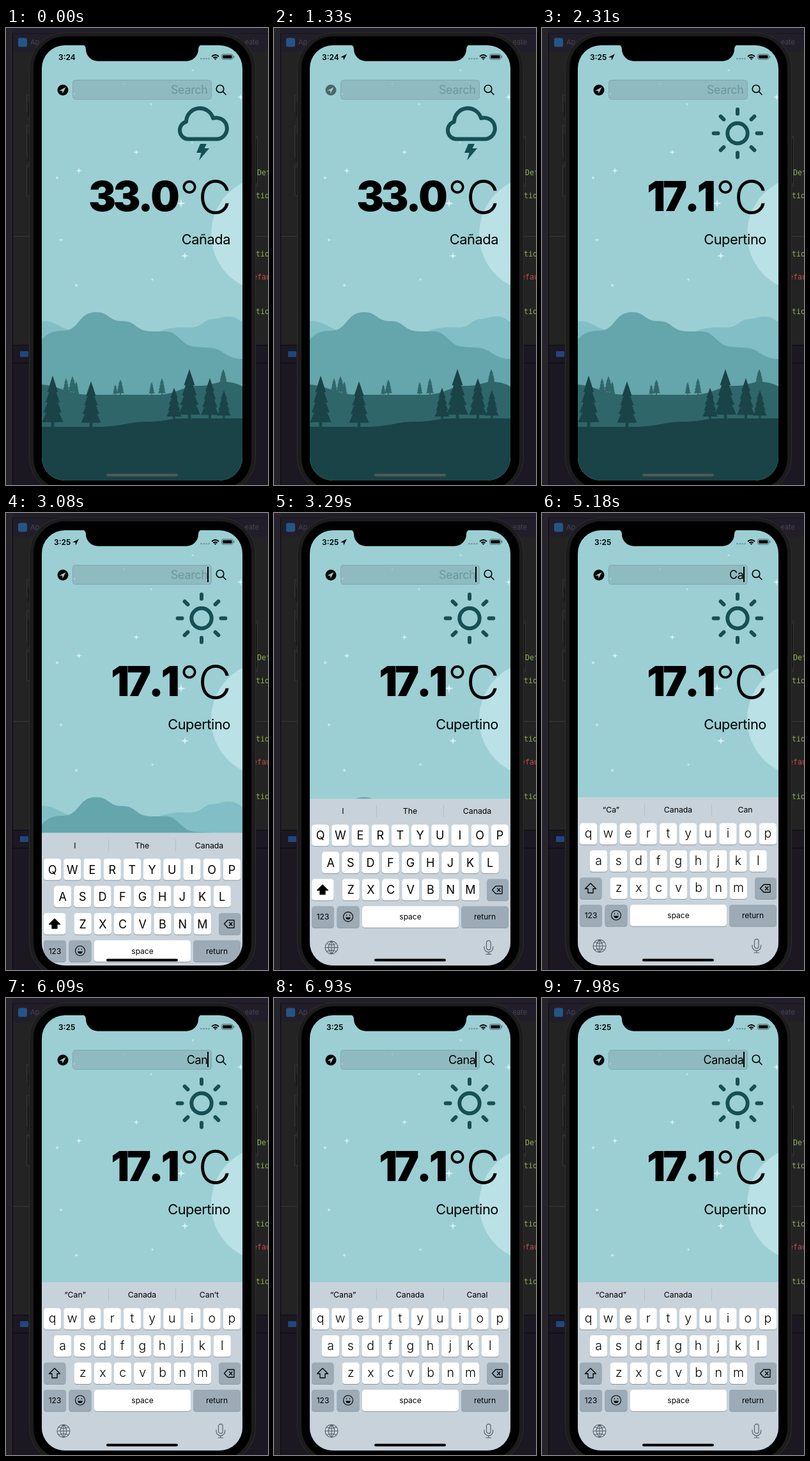
These frames come from a looping animation (410x714 px, 8 s). An HTML page:

```html
<!DOCTYPE html>
<html lang="en">
<head>
<meta charset="utf-8">
<title>Weather search</title>
<style>
html, body { margin: 0; width: 100%; height: 100%; overflow: hidden; background: #232324; }
svg { display: block; width: 410px; height: 714px; font-family: Inter, Roboto, sans-serif; }
.code { font: 11.6px "DejaVu Sans Mono", monospace; fill: #8fb04a; }
.mid { text-anchor: middle; }
.end { text-anchor: end; }
.tight { letter-spacing: -.02em; }
#degrees { font-kerning: none; letter-spacing: -.065em; }
</style>
</head>
<body>
<svg id="stage" viewBox="0 0 410 714">
  <defs>
    <clipPath id="screenClip"><rect x="56" y="27" width="314" height="680" rx="36"/></clipPath>
    <path id="pointer" d="M0 5.2L10 0L5 10L4.6 5.6Z"/>
  </defs>

  <!-- Desktop behind the phone -->
  <rect width="410" height="714" fill="#232324"/>
  <rect width="410" height="37" fill="#211e29"/>
  <path d="M0 8.5H410" stroke="#17151c"/>
  <rect y="496" width="410" height="218" fill="#1b1822"/>
  <rect width="10" height="714" fill="#27232b"/>
  <path d="M10.5 8V714M11 495.5H410M11 523.5H410" stroke="#0b0a0e"/>
  <path d="M11 325.5H410" stroke="#38383a"/>
  <path d="M37 104.500H32.500V130H37M37 152.500H32.500V200H37M37 214.500H32.500V262H37M388 169.500H393.500V247H388" fill="none" stroke="#363638"/>
  <rect x="19" y="15.500" width="14" height="14" rx="3" fill="#245586"/>
  <rect x="22" y="505" width="13" height="9" rx="1" fill="#20467f"/>
  <g font-size="11" fill="#48434f"><text x="38" y="26">Ap</text><text class="end" x="396" y="26">eate</text></g>
  <g class="code">
    <text x="393" y="230">Def</text><text x="384" y="266">ation</text><text x="384" y="357">ation</text>
    <text x="386" y="393" fill="#c94848">efault</text><text x="384" y="447">ation</text>
  </g>

  <!-- Phone body -->
  <path d="M35.500 117V139M35.500 167V208M35.500 219V261M391.500 174V242" stroke="#151515" stroke-width="2"/>
  <rect x="36.500" y="7.500" width="354" height="719" rx="56" fill="#1c1c1d" stroke="#2d2d2e"/>
  <rect x="43" y="13" width="341" height="708" rx="50" fill="#000"/>

  <g clip-path="url(#screenClip)">
    <rect x="56" y="27" width="314" height="680" fill="#9bcfd4"/>
    <circle cx="411" cy="322" r="90" fill="#bae1e5"/>
    <path id="stars" fill="#d9f2f4"/>
    <path d="M56 458C72 456 82 466 98 472L140 520H56ZM240 474C256 468 270 467 286 468C306 469 308 456 322 455C336 454 340 450 351 451C361 451 364 457 370 459V530H240Z" fill="#82bec5"/>
    <path d="M56 487C66 475 76 473 90 473C116 472 112 444 141 444C162 444 160 458 182 458C204 457 202 474 228 474H250C270 474 274 497 296 498C318 500 326 498 338 506C350 514 358 517 370 517V600H56Z" fill="#65a5ac"/>
    <path d="M56 557C82 559 102 573 130 573H238C268 572 278 559 300 559C326 559 324 552 346 553Q360 554 370 560V650H56Z" fill="#2f666a"/>
    <path id="farTrees" fill="#2f666a"/>
    <path d="M56 623H150C184 622 192 615 222 615C250 615 252 610 282 610H370V707H56Z" fill="#1a4347"/>
    <path id="nearTrees" fill="#1a4347"/>

    <!-- Search row -->
    <g id="locate"><circle cx="89" cy="97" r="8.500"/><use href="#pointer" x="83.500" y="92.500" fill="#9bcfd4"/></g>
    <rect x="104.500" y="81.500" width="217" height="30" rx="4" fill="#8fbac0" stroke="#80a9af"/>
    <path id="fieldStars" fill="#b9dadd"/>
    <text id="query" class="end tight" x="315.500" y="103" font-size="18"></text>
    <rect id="caret" x="315" y="84" width="2" height="24"/>
    <g fill="none" stroke="#000" stroke-width="1.600" stroke-linecap="round"><circle cx="335" cy="95" r="5.800"/><path d="M339.300 99.300L344 104"/></g>

    <!-- Weather -->
    <g id="storm" fill="none" stroke="#174f56" stroke-width="6" stroke-linejoin="round">
      <path d="M284 173.500A13.800 13.800 0 0 1 282 146.500A21.400 21.400 0 0 1 324 141A16.700 16.700 0 1 1 331 173.500Z"/>
      <path d="M304 181H314L310.500 188H318L302 207L305.500 195H298Z" fill="#174f56" stroke="none"/>
    </g>
    <g id="sun" fill="none" stroke="#174f56" stroke-width="6" stroke-linecap="round"><circle cx="306" cy="164.500" r="15.700"/><path id="rays"/></g>
    <text id="degrees" class="end" x="267.500" y="286" font-size="64" font-weight="900"></text>
    <text class="mid" x="287" y="286" font-size="66" font-weight="300">°</text>
    <text class="end" x="353" y="290" font-size="72" font-weight="300">C</text>
    <text id="city" class="end tight" x="351" y="338" font-size="21.800"></text>

    <g id="keyboard"></g>
    <rect id="home" x="157" y="696.500" width="112" height="4" rx="2"/>
  </g>

  <!-- Notch and status bar -->
  <path d="M119 26Q125 27 125 33A18.700 18.700 0 0 0 143.700 51.700H282.300A18.700 18.700 0 0 0 301 33Q301 27 307 26Z"/>
  <g font-size="12" font-weight="600">
    <text id="clock" x="82" y="49.500"></text>
    <g id="tracking"><text id="trackClock" x="75" y="49.500"></text><use href="#pointer" x="104" y="40.500"/></g>
  </g>
  <path d="M305.500 48H319" stroke="#6d9297" stroke-width="2.600" stroke-linecap="round" stroke-dasharray="0 4"/>
  <g fill="none" stroke="#000" stroke-width="1.900"><path d="M322 44.500Q327.500 39.500 333 44.500M324.300 46.800Q327.500 44 330.700 46.800"/><path d="M326 48L327.500 49.500L329 48Z" stroke-width="1"/></g>
  <rect x="337.500" y="41" width="17.500" height="8" rx="2.400" fill="none" stroke="#4b686b"/><rect x="339" y="42.500" width="14.500" height="5" rx="1.200"/><path d="M356.600 43.500V46.500" stroke="#4b686b" stroke-width="1.200"/>
</svg>
<script>
const LOOP = 8000, STEP = 70, KEY_W = 27.2, KEY_H = 33.5, PITCH = 31.2;
const $ = id => document.getElementById(id);
const clamp = x => Math.max(0, Math.min(1, x));
const ramp = (t, from, to) => clamp((t - from) / (to - from));

function add(parent, tag, attrs, text) {
  const node = document.createElementNS("http://www.w3.org/2000/svg", tag);
  for (const name in attrs) node.setAttribute(name, attrs[name]);
  if (text !== undefined) node.textContent = text;
  return parent.appendChild(node);
}
const setText = (node, text) => { if (node.textContent !== text) node.textContent = text; };
const fade = (node, opacity) => node.setAttribute("opacity", opacity);

// Scenery
const star = ([x, y, r]) => {
  const k = r * .2;
  return `M${x} ${y - r}L${x + k} ${y - k}L${x + r} ${y}L${x + k} ${y + k}L${x} ${y + r}L${x - k} ${y + k}L${x - r} ${y}L${x - k} ${y - k}Z`;
};
const tree = ([x, top, base, width]) => {
  const h = base - top, half = width / 2;
  const tier = (from, to, w) =>
    `M${x} ${top + h * from}L${x + half * w} ${top + h * to}H${x - half * w}Z`;
  return tier(0, .32, .5) + tier(.12, .52, .68) + tier(.25, .71, .84) + tier(.4, .9, 1) +
    `M${x - half * .14} ${top + h * .8}H${x + half * .14}V${base + 3}H${x - half * .14}Z`;
};
const draw = (id, shape, items) => $(id).setAttribute("d", items.map(shape).join(""));
draw("stars", star, [[114, 223, 5], [80, 234, 3.5], [204, 194, 4.5], [227, 119, 2.2], [292, 66, 2.2],
  [367, 108, 5.5], [274, 274, 7], [280, 356, 6], [86, 331, 3.2], [110, 402, 3.2], [229, 393, 2.8], [291, 179, 2]]);
draw("fieldStars", star, [[185, 88, 1.8], [107, 103, 2]]);
draw("farTrees", tree, [[94, 547, 571, 11], [104, 544, 571, 14], [110, 552, 573, 9], [171, 557, 573, 8],
  [179, 549, 573, 12], [228, 553, 573, 9], [244, 547, 573, 12], [340, 533, 557, 13]]);
draw("nearTrees", tree, [[73, 543, 624, 33], [133, 552, 624, 31], [263, 562, 612, 23],
  [287, 533, 612, 34], [319, 547, 611, 28], [341, 566, 610, 21]]);
draw("rays", i => {
  const a = i * Math.PI / 4, p = r => `${306 + r * Math.cos(a)} ${164.5 + r * Math.sin(a)}`;
  return `M${p(30.5)}L${p(37.3)}`;
}, [...Array(8).keys()]);

// Keyboard
const board = $("keyboard"), keys = {};
add(board, "rect", { x: 56, y: 444, width: 314, height: 330, fill: "#c7d2da" });
add(board, "path", { d: "M160.500 454V473M265.500 454V473", stroke: "#b2bdc5" });
const hints = [108, 213, 318].map(x => add(board, "text", { x, y: 468, class: "mid", "font-size": 12.3 }, ""));

function keycap(x, y, width, fill) {
  add(board, "rect", { x, y: y + 1, width, height: KEY_H, rx: 4.3, fill: "#8a979f" });
  return add(board, "rect", { x, y, width, height: KEY_H, rx: 4.3, fill });
}
[["qwertyuiop", 59, 484.5], ["asdfghjkl", 75, 527], ["zxcvbnm", 106.6, 569.5]].forEach(([row, left, y]) =>
  [...row].forEach((letter, i) => {
    const x = left + i * PITCH;
    keycap(x, y, KEY_W, "#fff");
    keys[letter] = { x, y, label: add(board, "text", { x: x + KEY_W / 2, class: "mid" }) };
  }));
const GRAY = "#9cabb6";
const shiftCap = keycap(59, 569.5, 34.5, GRAY);
const shiftArrow = add(board, "path", {
  d: "M76 578.500L84.500 587H80V593.500H72V587H67.500Z", stroke: "#000", "stroke-width": 1.3, "stroke-linejoin": "round" });
const line = (d, color = "#000", width = 1.3) => add(board, "path", {
  d, fill: "none", stroke: color, "stroke-width": width, "stroke-linecap": "round", "stroke-linejoin": "round" });
keycap(333, 569.5, 34, GRAY);
line("M341.500 586.500L347 580.500H357V592.500H347ZM349.500 584L354 589M354 584L349.500 589");
[[59, 35, GRAY, "123"], [98.5, 35, GRAY, ""], [138, 151, "#fff", "space"], [293, 74, GRAY, "return"]].forEach(([x, w, fill, label]) => {
  keycap(x, 612, w, fill);
  add(board, "text", { x: x + w / 2, y: 633, class: "mid", "font-size": 12 }, label);
});
line("M123.500 628.500A7.500 7.500 0 1 1 108.500 628.500A7.500 7.500 0 1 1 123.500 628.500M113.500 625.500V626.500M118.500 625.500V626.500", "#000", 1.1);
add(board, "path", { d: "M112 629.500H120Q119 633 116 633Q113 633 112 629.500Z" });
line("M80 676.500A10 10 0 1 1 100 676.500A10 10 0 1 1 80 676.500M90 666.500V686.500M80 676.500H100M90 666.500Q80.500 676.500 90 686.500M90 666.500Q99.500 676.500 90 686.500M82.500 670.500Q90 674 97.500 670.500M82.500 682.500Q90 679 97.500 682.500", "#59646b", 1.1);
line("M332.500 669A3.300 3.300 0 0 1 339.100 669V677A3.300 3.300 0 0 1 332.500 677ZM329 675V677A6.800 6.800 0 0 0 342.600 677V675M335.800 684V687M332 687H339.600", "#59646b", 1.2);

const popup = add(board, "g", {});
add(popup, "path", {
  d: "M4 34H23Q27 34 27 30V4C27 -6 41 -4 41 -16V-42Q41 -49 34 -49H-7Q-14 -49 -14 -42V-16C-14 -4 0 -6 0 4V30Q0 34 4 34Z",
  fill: "#fff", stroke: "#aab6be", "stroke-width": .6 });
const popupLabel = add(popup, "text", { x: 13.5, y: -14, class: "mid", "font-size": 30, "font-weight": 300 });

// Each press: finger down, finger up, character
const presses = [[4410, 4620, "C"], [4970, 5110, "a"], [5670, 5880, "n"],
  [6510, 6650, "a"], [7210, 7420, "d"], [7700, 7910, "a"]];
const suggestions = [[0, "I", "The", "Canada"], [4690, "“C”", "Can", "Could"], [5180, "“Ca”", "Canada", "Can"],
  [5950, "“Can”", "Canada", "Can’t"], [6720, "“Cana”", "Canada", "Canal"], [7560, "“Canad”", "Canada", ""]];

let capsShown;
function setCaps(caps) {
  if (caps === capsShown) return;
  capsShown = caps;
  for (const letter in keys) {
    const { y, label } = keys[letter];
    label.textContent = caps ? letter.toUpperCase() : letter;
    label.setAttribute("y", y + (caps ? 23.5 : 22.5));
    label.setAttribute("font-size", caps ? 18 : 19.5);
    label.setAttribute("font-weight", caps ? 400 : 300);
  }
  shiftCap.setAttribute("fill", caps ? "#fff" : GRAY);
  shiftArrow.setAttribute("fill", caps ? "#000" : "none");
}

function caretOpacity(t) {
  if (t < 2940) return 0;
  if (t < 3780) return 1 - ramp(t, 3360, 3570);
  if (t < 5530) return ramp(t, 3710, 3990);
  return t < 5880 ? 1 - ramp(t, 5530, 5740) : 1;
}

function render(t) {
  const updated = t >= 1820;
  fade($("storm"), updated ? 0 : 1);
  fade($("sun"), updated ? 1 : 0);
  setText($("degrees"), updated ? "17.1" : "33.0");
  setText($("city"), updated ? "Cupertino" : "Cañada");
  fade($("locate"), t < 1120 ? 1 : .25 + .75 * ramp(t, 1190, 1610));

  const time = t < 2310 ? "3:24" : "3:25";
  setText($("clock"), time);
  setText($("trackClock"), time);
  fade($("clock"), t < 1330 ? 1 : ramp(t, 3710, 3990));
  fade($("tracking"), t < 1330 ? 0 : 1 - ramp(t, 3500, 3710));

  // Critically damped slide
  const s = Math.max(0, t - 2920) * .01826;
  const lift = 1 - (1 + s) * Math.exp(-s);
  board.setAttribute("transform", `translate(0 ${263 * (1 - lift)})`);
  $("home").setAttribute("fill", t < 2940 ? "#525a5b" : "#000");

  const typed = presses.filter(p => t >= p[1]).map(p => p[2]).join("");
  setText($("query"), typed || "Search");
  $("query").setAttribute("fill", typed ? "#000" : "#6c979d");
  fade($("caret"), caretOpacity(t));
  setCaps(!typed);
  const words = suggestions.filter(row => t >= row[0]).pop();
  hints.forEach((hint, i) => setText(hint, words[i + 1]));

  const press = presses.find(p => t >= p[0] && t < p[1]);
  fade(popup, press ? 1 : 0);
  if (press) {
    const { x, y } = keys[press[2].toLowerCase()];
    popup.setAttribute("transform", `translate(${x} ${y})`);
    setText(popupLabel, press[2]);
  }
}

function tick() {
  render(Math.floor(performance.now() % LOOP / STEP) * STEP);
  requestAnimationFrame(tick);
}
tick();
</script>
</body>
</html>
```
